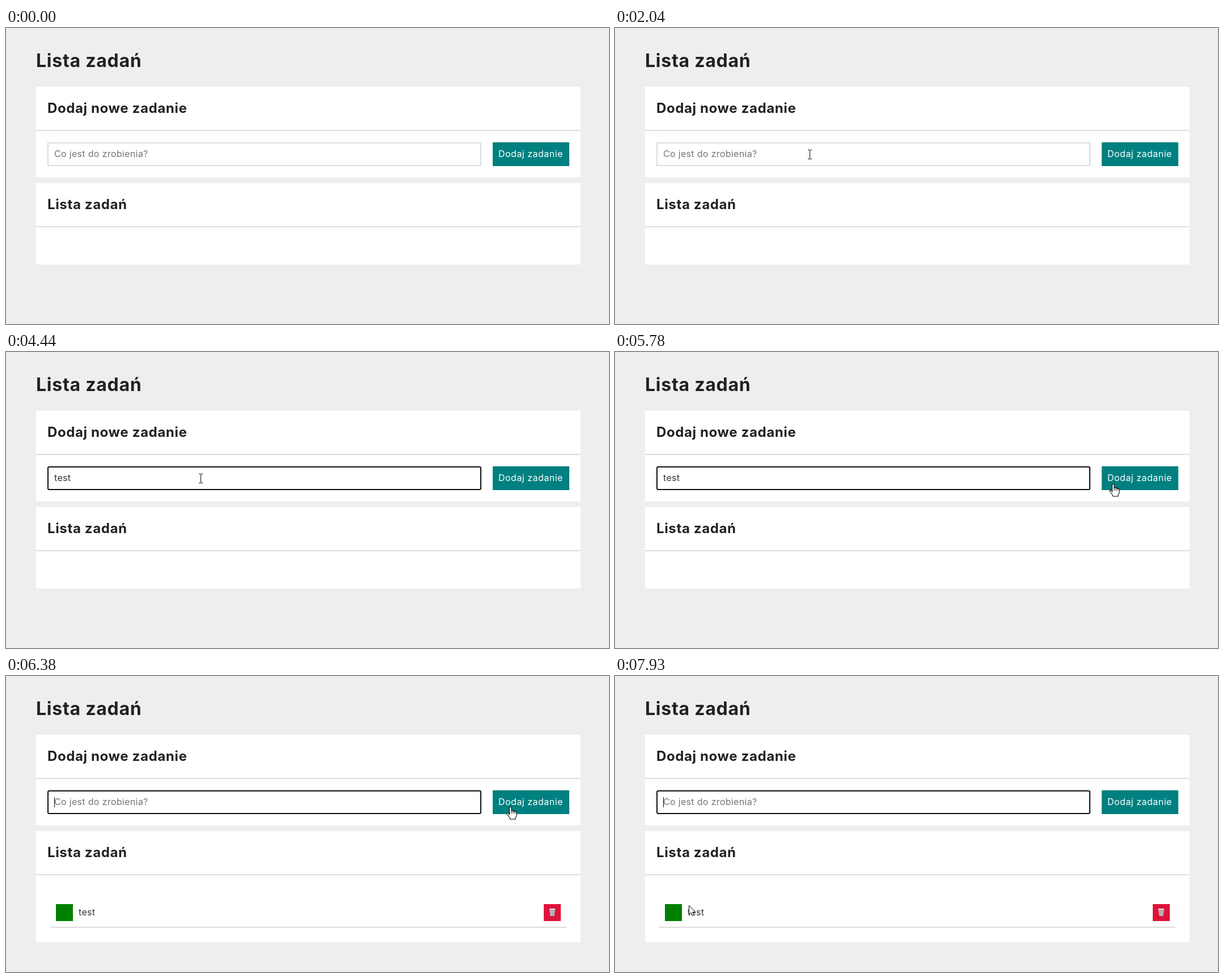
Write an HTML page with a canvas that moves like this. It is 1063 px wide and 523 px high and loops after 7.99 s.

```html
<!DOCTYPE html>
<html lang="pl">
<head>
<meta charset="utf-8">
<title>Lista zadań</title>
<style>
html, body { margin: 0; width: 100%; height: 100%; overflow: hidden; background: #eee; }
canvas { display: block; }
</style>
</head>
<body>
<canvas id="stage" width="1063" height="523"></canvas>
<script>
const LOOP = 7990;
const BLINK = 530;
const FAMILY = 'Inter, "Open Sans", sans-serif';
const ctx = document.getElementById('stage').getContext('2d');

const typing = [[3240, 't'], [3380, 'te'], [3580, 'tes'], [3910, 'test']];
const caretStarts = [2180, 3240, 3380, 3580, 3910, 6380];

const easeOut = p => 1 - (1 - p) ** 2;
const easeInOut = p => p * p * (3 - 2 * p);
const mix = (a, b, p) => a + (b - a) * p;

// Progress in n equal jumps, as a pointer sampled at a low rate.
function stepped(t, from, to, n) {
  const p = Math.floor((t - from) / (to - from) * n + 0.08) / n;
  return Math.min(1, Math.max(0, p));
}

function between(a, b, p) {
  return [mix(a[0], b[0], p), mix(a[1], b[1], p)];
}

function pointerAt(t) {
  const field = [343, 223], edge = [861, 231], button = [889, 231];
  if (t < 1110) return null;
  if (t < 1980) return between([948, 499], [347, 225], easeOut(stepped(t, 1110, 1850, 11)));
  if (t < 4970) return field;
  if (t < 5780) {
    const p = easeInOut(stepped(t, 4970, 5730, 10));
    const [x, y] = between(field, edge, p);
    return [x, y - 20 * p * (1 - p)];
  }
  if (t < 7310) return between([878, 233], button, easeOut(stepped(t, 5780, 6040, 4)));
  const p = 0.1 + 0.9 * stepped(t, 7310, 7930, 9);
  return between(button, [130, 405], easeInOut(p));
}

function box(x, y, w, h, color) {
  ctx.fillStyle = color;
  ctx.fillRect(x, y, w, h);
}

function setFont(size, weight, spacing) {
  ctx.font = `${weight} ${size}px ${FAMILY}`;
  ctx.letterSpacing = `${size * spacing}px`;
}

function label(str, x, y, size, weight, color, spacing = 0.02) {
  setFont(size, weight, spacing);
  ctx.fillStyle = color;
  ctx.fillText(str, x, y);
}

function panel(y, h, title) {
  box(53, y, 960, h, '#fff');
  box(53, y + 76, 960, 2, '#ddd');
  label(title, 73, y + 46, 24, 700, '#202124', 0.026);
}

function drawField(t, blurred) {
  const focused = t >= 2170 && !blurred;
  const w = blurred ? 763 : 765;
  ctx.lineWidth = 2;
  ctx.strokeStyle = focused ? '#101010' : '#ddd';
  ctx.beginPath();
  ctx.roundRect(74, 203, w - 2, 40, focused ? 2 : 0);
  ctx.stroke();

  let value = '';
  if (t < 6380) for (const [at, str] of typing) if (t >= at) value = str;
  if (value) label(value, 85, 228, 16, 400, '#333');
  else label('Co jest do zrobienia?', 85, 228, 16, 400, '#757575');

  const start = caretStarts.filter(s => t >= s - 10).pop();
  if (focused && Math.floor(Math.max(0, t - start) / BLINK) % 2 === 0) {
    setFont(16, 400, 0.02);
    box(85 + Math.round(ctx.measureText(value).width), 214, 1, 18, '#000');
  }
}

function drawButton(active) {
  const x = active ? 856 : 858;
  box(x, 202, 993 - x, 42, active ? '#000' : '#008080');
  if (active) box(857, 203, 135, 40, '#008080');
  label('Dodaj zadanie', active ? 867 : 868, 228, 16, 400, '#fff', 0.03);
}

function drawTask() {
  box(88, 403, 30, 30, '#008000');
  label('test', 128, 423, 16, 400, '#333');
  box(78, 443, 910, 2, '#ddd');
  box(948, 403, 30, 30, '#dc143c');
  shape([[958, 412], [968, 412], [966.5, 424], [959.5, 424]], '#c9c4c4');
  box(958, 411, 10, 2, '#eee');
  box(959, 413, 8, 1, '#85777b');
  for (const x of [960.5, 963, 965.5]) box(x, 415, 0.8, 8, '#8d8083');
}

function shape(points, fill, stroke) {
  ctx.beginPath();
  points.forEach(([x, y]) => ctx.lineTo(x, y));
  ctx.closePath();
  ctx.fillStyle = fill;
  ctx.fill();
  if (stroke) {
    ctx.lineWidth = 1;
    ctx.lineJoin = 'round';
    ctx.strokeStyle = stroke;
    ctx.stroke();
  }
}

function drawArrow() {
  shape([[0.5, 0.5], [0.5, 16.5], [4, 13.2], [6.3, 18.5], [8.8, 17.4],
    [6.6, 12.2], [11.8, 12.2]], '#fff', '#000');
}

function drawBeam() {
  box(0, -7, 1, 15, '#000');
  for (const y of [-8, 8]) {
    box(-3, y, 3, 1, '#000');
    box(1, y, 3, 1, '#000');
  }
}

function drawHand() {
  ctx.beginPath();
  ctx.moveTo(-1.5, 14);
  ctx.lineTo(-1.5, 1.5);
  ctx.quadraticCurveTo(0.3, -1, 2, 1.5);
  ctx.lineTo(2, 7);
  for (const [x, y] of [[5, 6.5], [8, 7.2], [11, 8.5]]) {
    ctx.quadraticCurveTo(x - 1, y - 1, x, y + 1.3);
  }
  ctx.lineTo(11, 15);
  ctx.quadraticCurveTo(10.7, 17.5, 9, 19.5);
  ctx.lineTo(9, 22);
  ctx.lineTo(0, 22);
  ctx.quadraticCurveTo(-1, 19, -3.5, 16);
  ctx.lineTo(-6, 12.5);
  ctx.quadraticCurveTo(-6, 9.5, -3.5, 11);
  ctx.closePath();
  ctx.fillStyle = '#fff';
  ctx.fill();
  ctx.lineWidth = 1.1;
  ctx.lineJoin = 'round';
  ctx.strokeStyle = '#000';
  ctx.stroke();
  for (const x of [2, 5, 8]) box(x - 0.5, 7, 1, 5, '#000');
}

function drawPointer(t, pressed) {
  const pos = pointerAt(t);
  if (!pos) return;
  const [x, y] = pos.map(Math.round);
  const inRow = y >= 202 && y < 244;
  ctx.save();
  ctx.translate(x, y);
  if (pressed) {
    ctx.fillStyle = 'rgba(240, 220, 0, 0.6)';
    ctx.beginPath();
    ctx.arc(0, -0.5, 12, 0, Math.PI * 2);
    ctx.fill();
  }
  if (inRow && x >= 73 && x < 838) drawBeam();
  else if (inRow && x >= 858 && x < 993) drawHand();
  else drawArrow();
  ctx.restore();
}

function draw(t) {
  const pressing = t >= 6310 && t < 6380;
  const added = t >= 6380;
  box(0, 0, 1063, 523, '#eee');
  label('Lista zadań', 53, 69, 32, 700, '#202124', 0.023);
  panel(104, 160, 'Dodaj nowe zadanie');
  panel(274, added ? 196 : 144, 'Lista zadań');
  drawField(t, pressing);
  drawButton(pressing);
  if (added) drawTask();
  drawPointer(t, pressing || (t >= 2170 && t < 2240));
}

const began = performance.now();
function tick() {
  draw((performance.now() - began) % LOOP);
  requestAnimationFrame(tick);
}
tick();
</script>
</body>
</html>
```
